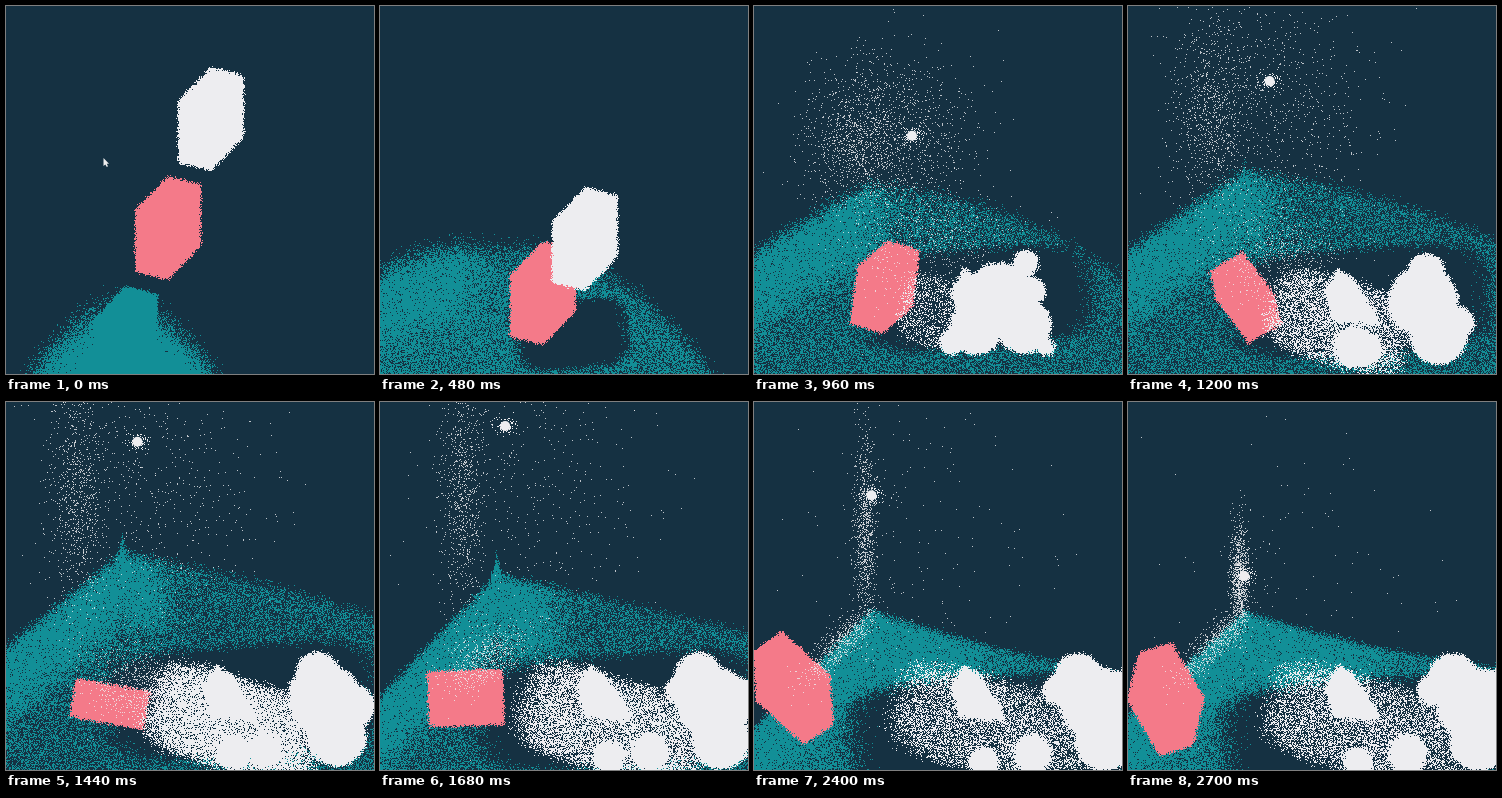
An HTML page with a canvas for the animation above (2.76 s loop, 368x368 px).

```html
<!DOCTYPE html>
<html>
<head>
<meta charset="utf-8">
<style>
html, body { margin: 0; width: 100%; height: 100%; overflow: hidden; background: #153142; }
canvas { display: block; width: 368px; height: 368px; }
</style>
</head>
<body>
<canvas id="stage" width="368" height="368"></canvas>
<script>
const SIZE = 368, LOOP = 2760, STEP = 60, BEAT = 480, IMPACT = 600;
const BG = [21, 49, 66], TEAL = [18, 143, 151], PINK = [244, 122, 137], WHITE = [237, 237, 240];
const stage = document.getElementById('stage').getContext('2d');
const maskCanvas = document.createElement('canvas');
maskCanvas.width = maskCanvas.height = SIZE;
const mask = maskCanvas.getContext('2d', { willReadFrequently: true });
const picture = stage.createImageData(SIZE, SIZE);

function randomizer(seed) {
  return () => {
    seed = (seed + 0x6D2B79F5) | 0;
    let r = Math.imul(seed ^ (seed >>> 15), 1 | seed);
    r = (r + Math.imul(r ^ (r >>> 7), 61 | r)) ^ r;
    return ((r ^ (r >>> 14)) >>> 0) / 4294967296;
  };
}
const random = randomizer(7);
const gauss = () => Math.sqrt(-2 * Math.log(1 - random())) * Math.cos(2 * Math.PI * random());
const noise = Float32Array.from({ length: SIZE * SIZE }, () => 0.02 + random() * 0.975);

const lerp = (a, b, k) => a + (b - a) * k;
const clamp = v => Math.max(0, Math.min(1, v));
const sigmoid = v => 1 / (1 + Math.exp(-v));
const bump = (t, at, width) => Math.exp(-(((t - at) / width) ** 2));
const decay = (t, from, life) => Math.exp(-Math.max(0, t - from) / life);
const fall = t => 0.176 * t + 1.54e-4 * t * t;

// Value at time t of a curve with one point per beat.
function track(t, ...points) {
  const i = Math.min(Math.floor(t / BEAT), points.length - 2);
  return lerp(points[i], points[i + 1], t / BEAT - i);
}

// Softly bounded, tilted superellipse: 1 inside, 0 outside.
function pool(cx, cy, rx, ry, tilt, hardness) {
  const c = Math.cos(tilt), s = Math.sin(tilt);
  return (x, y) => {
    const u = ((x - cx) * c + (y - cy) * s) / rx;
    const v = ((y - cy) * c - (x - cx) * s) / ry;
    return sigmoid(hardness * (1 - u ** 4 - v ** 4));
  };
}

// Teal sand: a sloping surface around a peak, a dense ridge below it, and a hollow.
function tealField(t) {
  const peakX = 116, ridgeDepth = 75;
  const peakY = track(t, 303, 245, 180, 152, 193, 208, 210);
  const left = track(t, 0, -0.2, 0.45, 0.78, 1.3, 1.05, 0.85);
  const right = track(t, 0, -0.15, 0.05, 0.17, 0.28, 0.34, 0.31);
  const floor = track(t, 1, 0.65, 0.5, 0.42, 0.5, 0.7, 0.7);
  const curve = 0.0085 * decay(t, 0, 600) - 0.0005;
  const spike = 24 * bump(t, 1600, 350);
  const soft = 1 + 6 * decay(t, 0, 1200);
  const ridgeEnd = 60 + 0.07 * t;
  const growth = 1 - decay(t, 250, 500);
  const hollow = pool(160 + 85 * growth, track(t, 345, 328, 292, 298, 318, 330, 335),
    1 + 150 * growth, 1 + 56 * Math.sqrt(growth), -0.08, 6);

  const columns = Array.from({ length: SIZE }, (_, x) => {
    const d = Math.abs(x - peakX);
    return {
      top: peakY + d * (x < peakX ? left : right) + curve * d * d - spike * Math.exp(-d / 3),
      ridge: lerp(floor, 0.93, sigmoid((ridgeEnd - x) / 8))
    };
  });
  return (x, y) => {
    const { top, ridge } = columns[x];
    const depth = y - top;
    if (depth < -6 * soft) return 0;
    const body = lerp(floor, ridge, sigmoid((ridgeDepth - depth) / 8));
    return body * sigmoid(depth / soft) * (1 - hollow(x, y));
  };
}

// Loose white grains around the heap.
function grainField(t) {
  const k = 1 - decay(t, 960, 300);
  const density = track(t, 0, 0, 0.3, 0.85, 0.55, 0.5, 0.5);
  const area = pool(lerp(178, 240, k), lerp(305, 326, k), lerp(32, 100, k), lerp(34, 48, k), 0.3, 4);
  return (x, y) => density * area(x, y);
}

// Six-sided block; "square" pulls its slanted ends out into a rectangle.
function block(x, y, w = 1, h = 1, turn = 0, square = 0) {
  const half = [[33, -44], [33, 18], [lerp(0, 33, square), lerp(52, 44, square)]];
  const c = Math.cos(turn), s = Math.sin(turn);
  mask.beginPath();
  for (const side of [1, -1]) {
    for (const [px, py] of half) {
      const u = px * w * side, v = py * h * side;
      mask.lineTo(x + u * c - v * s, y + u * s + v * c);
    }
  }
  mask.fill();
}

function disc(x, y, r) {
  mask.beginPath();
  mask.arc(x, y, r, 0, 7);
  mask.fill();
}

function drawTealBlock(t) {
  if (t < 240) block(119, 332 + fall(t));
}

function drawPinkBlock(t) {
  const y = t < BEAT ? 222 + Math.min(65, fall(t)) : track(t, 287, 287, 281, 302, 290, 286, 304);
  block(track(t, 162, 163, 131, 104, 68, 39, 37), y,
    track(t, 1, 1, 0.92, 0.6, 1.1, 1.05, 1.03),
    track(t, 1, 1, 0.92, 0.86, 0.86, 1.05, 1.03),
    track(t, 0, 0, 0.13, -1.4, -1.82, -0.84, -0.35),
    track(t, 0, 0, 0.1, 0.95, 1, 0, 0));
}

// Each lump rolls from its place in the fresh heap to its resting place: x, y, radius.
const lumps = [
  [[272, 257, 13], [325, 276, 25]],
  [[246, 290, 34], [345, 302, 37]],
  [[270, 320, 28], [352, 340, 30]],
  [[222, 322, 27], [230, 360, 15]],
  [[198, 336, 13], [280, 352, 20]],
  [[292, 341, 9], [368, 292, 25]],
  [[278, 285, 14], [305, 288, 16]]
];

function drawWhiteHeap(t) {
  const squash = clamp((t - IMPACT) / 360);
  if (squash < 1) {
    block(lerp(205, 245, squash), 113 + fall(Math.min(t, IMPACT)) + 30 * squash,
      1, lerp(1, 0.7, squash), 0.3 * squash);
  }
  if (t < IMPACT) return;
  const roll = 1 - decay(t, 960, 350);
  for (const [fresh, rest] of lumps) {
    const [x, y, r] = fresh.map((v, i) => lerp(v, rest[i], roll));
    disc(lerp(215, x, squash), lerp(290, y, squash), r * squash);
  }
  if (squash === 1) mask.fill(new Path2D('M210 262l15 10 23 33 4 15-47-4-9-31z'));
}

const cover = (i, pixels) => pixels[i * 4 + 3] / 255;

function stippleField(field, color, shift) {
  for (let y = 0, i = 0; y < SIZE; y++) {
    for (let x = 0; x < SIZE; x++, i++) {
      if (field(x, y) > noise[(i + shift) % noise.length]) picture.data.set(color, i * 4);
    }
  }
}

function stippleShape(draw, color, t, softness, shift) {
  mask.clearRect(0, 0, SIZE, SIZE);
  mask.filter = `blur(${softness}px)`;
  draw(t);
  const pixels = mask.getImageData(0, 0, SIZE, SIZE).data;
  stippleField((x, y) => cover(y * SIZE + x, pixels), color, shift);
}

const grains = count => Array.from({ length: count }, () => [gauss(), gauss(), random()]);
const spray = grains(1100), column = grains(900), trail = grains(650), crumbs = grains(90);
const dot = (x, y) => stage.fillRect(Math.round(x), Math.round(y), 1, 1);

function scatter(list, share, x, y, sx, sy, shear = 0) {
  for (const [u, v, rank] of list) {
    if (rank < share) dot(x + u * sx, y + v * sy + shear * u * sx);
  }
}

function drawDust(t) {
  const age = t - IMPACT;
  const born = clamp(age / 360);
  const spread = 75 * (1 - decay(age, 0, 450));
  const height = 78 + 9e-5 * (t - 1700) ** 2;
  const settle = decay(t, 960, 400);
  stage.fillStyle = 'rgba(237,237,240,.78)';
  scatter(spray, born * decay(t, 960, 800), 130 + 0.014 * t, height, spread * 0.9, spread);
  scatter(column, born, 111 - 40 * bump(t, 1440, 420), height + 8,
    3 + 25 * decay(t, 900, 700), 70 * Math.sin(Math.PI * age / 2400));
  scatter(trail, born, Math.max(86, 280 - 0.104 * t), 240 + 40 * bump(t, 1440, 250),
    18 + 24 * settle, 10 + 24 * settle, -0.9 * clamp((t - 1400) / 600));
}

function drawCrumb(t) {
  const x = 115 + 43 * Math.exp((960 - t) / 500), y = 23 + 1.69e-4 * (t - 1755) ** 2;
  stage.fillStyle = 'rgb(237,237,240)';
  stage.beginPath();
  stage.arc(x, y, 5, 0, 7);
  stage.fill();
  scatter(crumbs, 1, x, y, 5, 4);
}

function drawCursor() {
  stage.fillStyle = '#eee';
  stage.fill(new Path2D('M97.5 152v8l1.8-1.6 1.5 2.6 1.2-.7-1.3-2.5h2.3z'));
}

let shown = -1;
function render(now) {
  const frame = Math.floor((now % LOOP) / STEP);
  if (frame !== shown) {
    shown = frame;
    const t = frame * STEP;
    for (let i = 0; i < noise.length; i++) picture.data.set([...BG, 255], i * 4);
    stippleField(tealField(t), TEAL, frame);
    stippleShape(drawTealBlock, TEAL, t, 0.8, frame);
    stippleShape(drawPinkBlock, PINK, t, 0.8, frame * 3);
    if (t > BEAT) stippleField(grainField(t), WHITE, frame * 2 + 9000);
    stippleShape(drawWhiteHeap, WHITE, t, t < IMPACT ? 0.9 : 1.8, frame * 2);
    stage.putImageData(picture, 0, 0);
    if (t > IMPACT) {
      drawDust(t);
      drawCrumb(t);
    }
    if (t < 240) drawCursor();
  }
  requestAnimationFrame(() => render(performance.now() - origin));
}
const origin = performance.now();
render(0);
</script>
</body>
</html>
```
